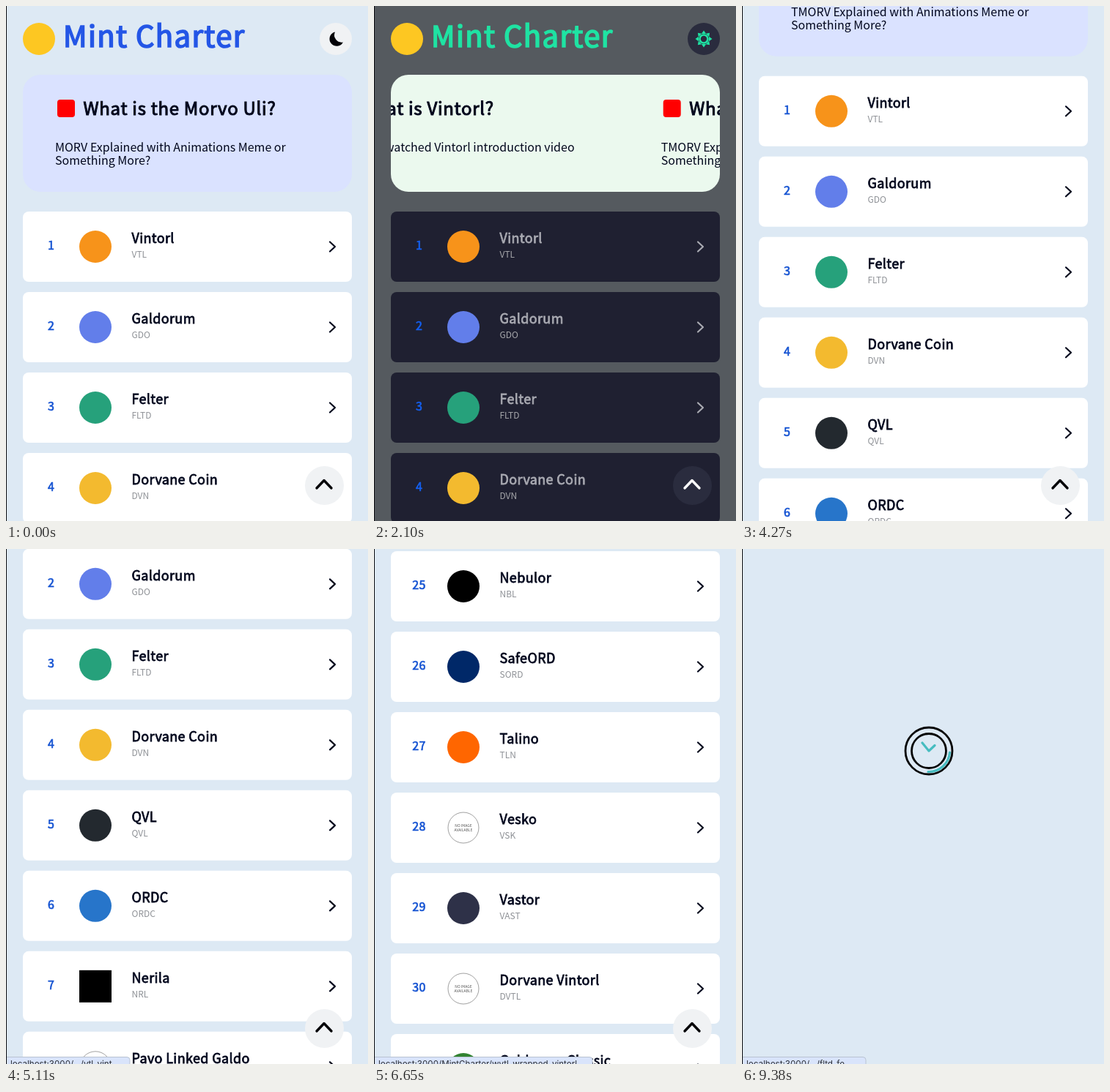
An HTML page for the animation above (9.45 s loop, 494 by 704 pixels).

```html
<!DOCTYPE html>
<html lang="en">
<head>
<meta charset="utf-8">
<title>Mint Charter</title>
<style>
  html, body { margin: 0; width: 100%; height: 100%; overflow: hidden; }
  svg {
    display: block; width: 494px; height: 704px; background: var(--bg);
    font-family: "Noto Sans CJK KR", "Noto Sans CJK JP", "Noto Sans CJK", "Noto Sans CJK SC", sans-serif;
    --accent: #2456e6; --card: #fff; --banner: #dae2ff; --button: #f0f2f4;
    --arrow: #020208; --rank: #1553d2;
  }
  svg.dark {
    --accent: #1fe3a3; --card: #1f2031; --banner: #ebf9ee; --button: #2a2c3e;
    --arrow: #fff; --rank: #1460f2;
  }
  .medium { stroke: currentColor; stroke-width: .042em; letter-spacing: .02em; fill: currentColor; }
  .title { font-size: 40px; color: var(--accent); letter-spacing: .035em; }
  .head { font-size: 24px; color: #01061c; letter-spacing: .03em; }
  .text { font-size: 16px; fill: #01061c; }
  .name { font-size: 18px; color: var(--ink); }
  .rank { font-size: 16px; color: var(--rank); text-anchor: middle; }
  .tick { font-size: 12px; fill: var(--soft); }
  .none { font-size: 5px; fill: #555; text-anchor: middle; }
  .card { fill: var(--card); }
  .button { fill: var(--button); }
  .line { fill: none; stroke-linecap: round; stroke-linejoin: round; }
  .go { stroke: var(--ink); stroke-width: 2.2; }
  #arrow { stroke: var(--arrow); stroke-width: 3.4; }
  #moon { fill: #020208; }
  #sun { display: none; fill: #1fe3a3; }
  .dark #sun { display: inline; }
  .dark #moon { display: none; }
  #arrow.hover { stroke: #2456e6; }
  #moon.hover { fill: #2456e6; }
  #status text { font: 11.6px Inter, Roboto, sans-serif; fill: #2b2f36; }
</style>
</head>
<body>
<svg id="stage" viewBox="0 0 494 704">
  <clipPath id="round"><rect x="23" y="94" width="449" height="160" rx="24"/></clipPath>
  <g id="page">
    <circle cx="45" cy="45" r="22" fill="#fdc722"/>
    <text class="medium title" x="78" y="56">Mint Charter</text>
    <circle class="button" cx="450" cy="45" r="22"/>
    <path id="moon" d="M449 35.500A9.800 9.800 0 1 0 460 49.500A10 10 0 0 1 449 35.500Z"/>
    <g id="sun" transform="translate(450 45)">
      <circle r="5.500" fill="none" stroke="#1fe3a3" stroke-width="2.600"/>
    </g>
    <rect x="23" y="94" width="449" height="160" rx="24" fill="var(--banner)"/>
    <g clip-path="url(#round)"><g id="slides"></g></g>
    <g id="rows"></g>
  </g>
  <g id="up">
    <circle class="button" cx="434.500" cy="655.500" r="26.500"/>
    <path id="arrow" class="line" d="M424 659L434 648.500L444 659"/>
  </g>
  <g id="loader" class="line" transform="translate(255 276)" stroke-width="2.800">
    <circle r="32" stroke="#050505"/>
    <circle r="23.500" stroke="#050505"/>
    <g stroke="#46bcc0" stroke-width="3.200">
      <path id="arc" d="M28.500 2A28.500 28.500 0 0 1 -1 28.500"/>
      <path d="M-9 -11L0 0L8 -7.500"/>
    </g>
  </g>
  <g id="status">
    <rect x="-5" y="694.500" height="20" rx="4" fill="#d9e4fb" stroke="#b9c3d2"/>
    <text x="6" y="708"></text>
  </g>
  <rect width="1" height="704" fill="#0c0d10"/>
</svg>
<script>
const LOOP = 9450, STEP = 70, SLIDE = 450, PITCH = 110;
const $ = id => document.getElementById(id);
const clamp = v => Math.min(1, Math.max(0, v));
const mix = (a, b, k) => a + (b - a) * k;
const rgb = (a, b, k) => `rgb(${a.map((v, i) => Math.round(mix(v, b[i], k)))})`;

// Cubic Bezier easing, solved by bisection.
function bezier(x1, y1, x2, y2) {
  const at = (a, b, s) => 3 * (1 - s) ** 2 * s * a + 3 * (1 - s) * s * s * b + s ** 3;
  return x => {
    let lo = 0, hi = 1;
    if (x <= 0 || x >= 1) return clamp(x);
    for (let i = 0; i < 24; i++) {
      const mid = (lo + hi) / 2;
      if (at(x1, x2, mid) < x) lo = mid; else hi = mid;
    }
    return at(y1, y2, lo);
  };
}
const ease = bezier(.25, .1, .25, 1);
const easeInOut = bezier(.42, 0, .58, 1);

// Value after a chain of moves: [start, end, target].
const follow = (moves, from, t, curve) =>
  moves.reduce((v, [a, b, to]) => t < a ? v : mix(v, to, curve((t - a) / (b - a))), from);

const slides = [
  ['Vintorl?', 'The most watched Vintorl introduction video'],
  ['Newtbean?', 'TMORV Explained with Animations Meme or', 'Something More?'],
  ['Galdorum?', '3 minute explanation of Galdorum by inventor', 'Matveik Loserin'],
  ['the Morvo Uli?', 'MORV Explained with Animations Meme or', 'Something More?']
];
$('slides').innerHTML = slides.map(([topic, ...lines], i) => `
  <g transform="translate(${i * SLIDE})">
    <rect x="70" y="128" width="24" height="24" rx="4" fill="#f00"/>
    <text class="medium head" x="105.500" y="149">What is ${topic}</text>
    ${lines.map((s, n) => `<text class="text" x="67" y="${199 + 18 * n}">${s}</text>`).join('')}
  </g>`).join('');

const coins = {
  1: ['Vintorl', 'VTL', '#f7931a'], 2: ['Galdorum', 'GDO', '#627eea'],
  3: ['Felter', 'FLTD', '#26a17b'], 4: ['Dorvane Coin', 'DVN', '#f3ba2f'],
  5: ['QVL', 'QVL', '#23292f'], 6: ['ORDC', 'ORDC', '#2775ca'],
  7: ['Nerila', 'NRL', '#000'], 8: ['Pavo Linked Galdo', 'PLGDO', ''],
  25: ['Nebulor', 'NBL', '#000'], 26: ['SafeORD', 'SORD', '#002868'],
  27: ['Talino', 'TLN', '#ff6600'], 28: ['Vesko', 'VSK', ''],
  29: ['Vastor', 'VAST', '#2e3148'], 30: ['Dorvane Vintorl', 'DVTL', ''],
  31: ['Galdorum Classic', 'GDC', '#328332']
};
const heads = ['Hul', 'Bren', 'Pilt', 'Zom', 'Wask', 'Jurd', 'Krin'];
const tails = ['ova', 'itel', 'umo', 'ask', 'eron'];
const invent = n => {
  const name = heads[n % 7] + tails[n % 5];
  return [name, name.slice(0, 4).toUpperCase(), `hsl(${n * 67 % 360} 60% 48%)`];
};
function logo(n, color) {
  if (n === 7) return `<rect x="100" y="26" width="44" height="44" fill="${color}"/>`;
  if (color) return `<circle cx="122" cy="48" r="22" fill="${color}"/>`;
  return `<circle cx="122" cy="48" r="21" fill="#fff" stroke="#888" stroke-width=".8"/>
    <text class="none" x="122" y="47">NO IMAGE</text><text class="none" x="122" y="53">AVAILABLE</text>`;
}
let rows = '';
for (let n = 1; n <= 48; n++) {
  const [name, tick, color] = coins[n] || invent(n);
  rows += `<g transform="translate(0 ${281 + PITCH * (n - 1)})"><g id="row${n}">
    <rect class="card" x="23" width="449" height="96" rx="8"/>
    <text class="medium rank" x="61.500" y="52">${n}</text>${logo(n, color)}
    <text class="medium name" x="171.500" y="43">${name}</text>
    <text class="tick" x="171.500" y="63">${tick}</text>
    <path class="line go" d="M442 41.500L449 48L442 54.500"/>
  </g></g>`;
}
$('rows').innerHTML = rows;

for (let i = 0; i < 8; i++)
  $('sun').innerHTML += `<path d="M-3.200 -7L0 -11.500L3.200 -7Z" transform="rotate(${i * 45})"/>`;

const slideMoves = [[1242, 2332, 0], [2383, 3473, 1], [6786, 7876, 2]];
const scrollMoves = [[4040, 4850, 385], [5105, 5320, 900], [5720, 5960, 1660],
  [6270, 6650, 2918], [6900, 7360, 3750], [7839, 7840, 0]];

// Link bubble: [start, end, width, path].
const links = [
  [5110, 5950, 169, '.../vtl-vint...'],
  [5950, 7350, 298, 'MintCharter/wvtl-wrapped-vintorl'],
  [7350, 8200, 292, 'MintCharter/cro-cryptocom-chain'],
  [8750, LOOP, 169, '.../fltd-fe...']
];

function draw(now) {
  const t = Math.floor(now % LOOP / STEP) * STEP;
  const stage = $('stage'), loading = t >= 9170;
  const night = t < 3033 ? ease((t - 1715) / 1000) : 1 - ease((t - 3033) / 1000);
  stage.classList.toggle('dark', t >= 1715 && t < 3033);
  stage.style.setProperty('--bg', rgb([221, 233, 244], [15, 16, 18], night));
  stage.style.setProperty('--ink', rgb([1, 6, 28], [255, 255, 255], night));
  stage.style.setProperty('--soft', rgb([142, 145, 150], [178, 178, 182], night));

  const scroll = follow(scrollMoves, 0, t, ease);
  $('page').setAttribute('transform', `translate(0 ${-scroll})`);
  $('slides').setAttribute('transform', `translate(${-SLIDE * follow(slideMoves, 3, t, easeInOut)})`);
  $('moon').classList.toggle('hover', t >= 1540 && t < 3900);
  $('arrow').classList.toggle('hover', t >= 7700 && t < 8260);
  $('row3').setAttribute('transform',
    t >= 9100 ? 'translate(247.500 48) scale(1.05) translate(-247.500 -48)' : '');

  for (const id of ['page', 'up']) $(id).style.display = loading ? 'none' : '';
  $('loader').style.display = loading ? '' : 'none';
  $('arc').setAttribute('transform', `rotate(${(t - 9380) * .36})`);

  const link = links.find(([a, b]) => t >= a && t < b);
  $('status').style.display = link ? '' : 'none';
  if (link) {
    const [box, label] = $('status').children;
    box.setAttribute('width', link[2] + 5);
    label.textContent = 'localhost:3000/' + link[3];
  }
}
function tick() {
  draw(performance.now());
  requestAnimationFrame(tick);
}
tick();
</script>
</body>
</html>
```
